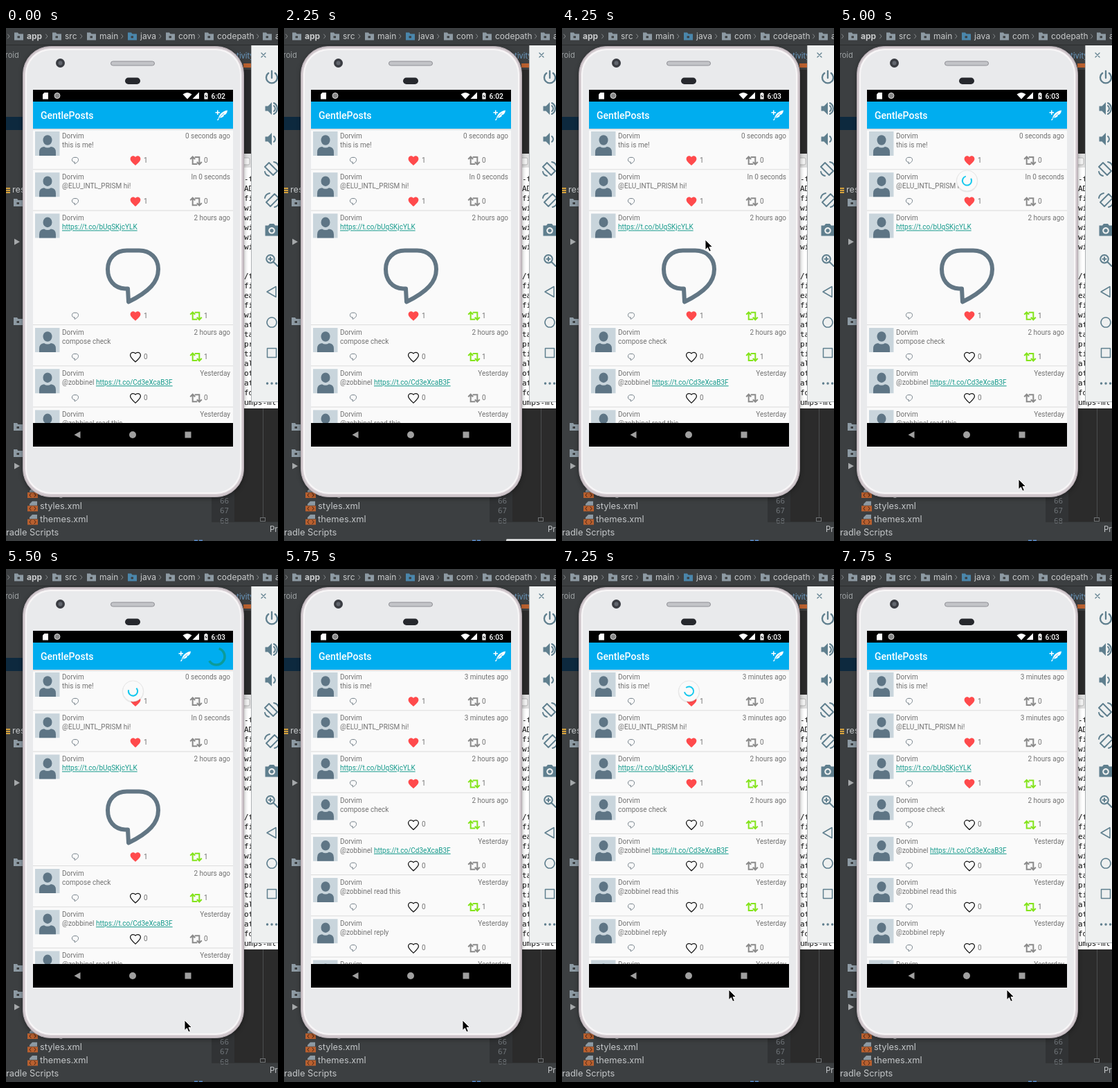
Animation, 393 px wide and 739 px high, one loop 8 s. Source, as an HTML page:

```html
<!DOCTYPE html>
<html lang="en">
<head>
<meta charset="utf-8">
<title>Timeline refresh</title>
<style>
  html, body { margin: 0; width: 100%; height: 100%; overflow: hidden; background: #3c3f41; }
  svg { display: block; width: 393px; height: 739px; }
  text { font-family: Roboto, sans-serif; font-size: 10px; white-space: pre; }
  .ide text { font-family: Inter, sans-serif; font-size: 12.8px; fill: #c3c6c8; }
  .ide .crumb { font-size: 12px; fill: #c9cbcc; }
  .ide .num { font: 11px "DejaVu Sans Mono", monospace; fill: #6d7276; }
  .term text { font: 11px "DejaVu Sans Mono", monospace; fill: #111; }
  .line { fill: none; stroke-linecap: round; stroke-linejoin: round; }
  .row text { fill: #727272; }
  .row .link { fill: #159a8c; text-decoration: underline; }
  .phone { filter: drop-shadow(0 2px 3px rgba(0, 0, 0, .35)); }
</style>
</head>
<body>
<svg viewBox="0 0 393 739" xmlns="http://www.w3.org/2000/svg">
  <defs>
    <path id="bubble" class="line" d="M-11.500 18C-28 17-36.500 5-36.500-10C-36.500-26-25-37-9-37H9C25-37 36.500-26 36.500-10C36.500 8 24 22-6.500 37L-7.500 18Z"/>
    <path id="heart" d="M0 9.350L-1.450 8.030C-6.600 3.360-10 .28-10-3.500C-10-6.580-7.580-9-4.500-9C-2.760-9-1.090-8.190 0-6.910C1.090-8.190 2.760-9 4.500-9C7.580-9 10-6.580 10-3.500C10 .28 6.600 3.360 1.450 8.040Z"/>
    <path id="retweet" class="line" style="stroke-linecap:butt;stroke-linejoin:miter" stroke-width="2" d="M-8.300-2L-4.800-5.500L-1.300-2M-4.800-5V5H1.800M8.300 2L4.800 5.500L1.300 2M4.800 5V-5H-1.800"/>
    <path id="folder" d="M0 0H5L6.500 2H13V11H0ZM4.500 5V8H8V5Z" fill-rule="evenodd"/>
    <clipPath id="view"><rect x="39" y="145" width="289" height="424"/></clipPath>
    <linearGradient id="shade" x2="0" y2="1">
      <stop stop-opacity=".16"/><stop offset="1" stop-opacity="0"/>
    </linearGradient>
  </defs>
  <g class="ide" id="ide"></g>
  <g class="term" id="term"></g>
  <rect id="tip" fill="#d5d6d7" rx="1.500" height="8"/>
  <g id="tools"></g>

  <g class="phone">
    <rect x="24.500" y="26.500" width="319" height="649" rx="40" fill="#cfc6cb" stroke="#b3aab0"/>
    <rect x="27.500" y="29.500" width="313" height="642" rx="37" fill="#f8f6f7" stroke="#dfd9dd"/>
    <rect x="30" y="32" width="308" height="637" rx="35" fill="#e9eaec"/>
  </g>
  <circle cx="78.500" cy="50.500" r="6.500" fill="#3a3c42"/>
  <circle cx="78.500" cy="50.500" r="3" fill="#62666e"/>
  <rect x="151.500" y="48" width="63" height="6" rx="3" fill="#c3c4c8" stroke="#8f9096"/>
  <rect x="172" y="71.500" width="22" height="9.500" rx="4.750" fill="#26282d"/>

  <rect x="39" y="89" width="289" height="514"/>
  <g fill="#fff">
    <path d="M55.500 93H61V102.500H53V95.500Z"/>
    <circle cx="74" cy="97.500" r="4" fill="#888" stroke="#ddd"/>
    <path d="M255.500 95.500Q262 90.500 268.500 95.500L262 102.500Z"/>
    <path d="M279 92.500V102H269.500Z"/>
    <path d="M286.500 94H288V93H290V94H291.500V102.500H286.500Z"/>
    <path d="M289.500 95L287.500 98.500H289L288.500 101.500L290.500 98H289Z" fill="#000"/>
    <text id="clock" x="296.500" y="101.500" style="font-size:10.400px;font-weight:500"></text>
  </g>
  <rect x="39" y="106" width="289" height="39" fill="#00adef"/>
  <text x="50" y="130.500" fill="#fff" style="font-size:14px;font-weight:500">GentlePosts</text>
  <g id="compose" fill="#fff">
    <path d="M302.500 121H305V118.500H306.500V121H309V122.500H306.500V125H305V122.500H302.500Z"/>
    <path d="M305 133L309 125Q313 119.500 320 118.500Q319.500 123 316.500 125L314 125.500L315 126.500Q312.500 129.500 308.500 129.500L306.500 133Z"/>
    <path d="M306.500 131L315 122.500" stroke="#00adef" stroke-width=".8"/>
  </g>
  <path id="loader" class="line" style="stroke-linecap:butt" stroke="#0c9b99" stroke-width="3.600"/>
  <g clip-path="url(#view)">
    <rect x="39" y="145" width="289" height="424" fill="#fafafa"/>
    <g id="before"></g>
    <g id="after"></g>
    <rect x="39" y="145" width="289" height="3" fill="url(#shade)"/>
  </g>
  <g fill="#a0a0a0">
    <path d="M98.500 586L107.500 581V591Z"/>
    <circle cx="183" cy="586" r="5"/>
    <rect x="258.500" y="581.500" width="9" height="9"/>
  </g>
  <g id="pull">
    <circle cy=".8" r="15.800" fill="#000" opacity=".07"/>
    <circle r="15" fill="#fafafa" stroke="#e3e3e3" stroke-width=".8"/>
    <path id="arc" class="line" style="stroke-linecap:butt" stroke="#14c8ee" stroke-width="2"/>
  </g>
  <path id="cursor" d="M0 0V14.500L3.400 11.400L5.800 17L8.300 16L5.900 10.500H10.500Z" fill="#000" stroke="#fff" stroke-width=".9"/>
</svg>

<script>
const $ = id => document.getElementById(id);
const LOOP = 8000;
const text = (x, y, s, attrs = '') => `<text x="${x}" y="${y}" ${attrs}>${s}</text>`;
const rect = (x, y, w, h, fill) => `<rect x="${x}" y="${y}" width="${w}" height="${h}" fill="${fill}"/>`;
const use = (id, x, y, scale, attrs) =>
  `<use href="#${id}" transform="translate(${x} ${y}) scale(${scale})" ${attrs}/>`;

// Code editor behind the phone
function drawIde() {
  const crumbs = [['app', 30], ['src', 85], ['main', 135], ['java', 194],
                  ['com', 249], ['codepath', 305], ['a', 389]];
  const ends = [59, 109, 168, 223, 279, 364];
  let s = rect(0, 0, 393, 739, '#3c3f41') + rect(0, 24, 393, 1, '#2b2d2e');
  crumbs.forEach(([name, x], i) => {
    s += use('folder', x - 18, 6.5, 1, `fill="${name === 'java' ? '#4a86ab' : '#8d9aa3'}"`);
    s += text(x, 16, name, `class="crumb"${i ? '' : ' style="font-weight:700"'}`);
  });
  for (const x of [4, ...ends])
    s += `<path class="line" d="M${x - 1.5} 9L${x + 1} 12L${x - 1.5} 15" stroke="#85898b"/>`;

  s += text(-8, 43, 'droid', 'style="font-size:11px;fill:#9fa3a5"');
  s += rect(0, 128, 26, 19, '#0d293e') + text(9, 237, 'res');
  for (const y of [230, 233, 236]) s += rect(0, y, 6, 2, '#d6a23c');
  for (const y of [246, 417, 569, 607]) s += use('folder', 11, y, 1, 'fill="#8d9aa3"');
  for (const y of [308, 631]) s += `<path d="M12 ${y - 4.5}V${y + 4.5}L20 ${y}Z" fill="#a5a8aa"/>`;

  ['strings', 'styles', 'themes'].forEach((name, i) => {
    const y = 673.5 + i * 19.3;
    s += text(49, y, name + '.xml');
    s += `<path d="M38 ${y - 11}H45V${y - 5}H34V${y - 7}Z" fill="#8d9aa3"/>` +
      rect(31, y - 4.5, 15, 8, '#b9602f') +
      `<path class="line" d="M36 ${y - 3}L34 ${y - .5}L36 ${y + 2}M41 ${y - 3}L43 ${y - .5}L41 ${y + 2}" stroke="#432315"/>`;
  });
  s += text(0, 731, 'radle Scripts');

  s += rect(297, 60, 33, 651, '#313335') + rect(330, 60, 63, 651, '#2b2b2b');
  [66, 67, 68].forEach((n, i) => s += text(309, 684.5 + i * 14.6, n, 'class="num"'));
  s += rect(371, 548, 1, 157, '#4b4e50') +
    '<rect x="367.500" y="705.500" width="7" height="5" fill="#2b2b2b" stroke="#707375"/>';
  s += rect(297, 711, 96, 1, '#323435') + text(381, 726, 'Pr', 'style="font-size:11.500px"');
  s += text(327, 44, 'ctivity', 'style="font-size:11px;fill:#6b9ac0"') + rect(343, 51, 11, 6, '#b9602f');
  s += rect(272, 737.5, 5, 2, '#5b8fd0') + rect(279, 737.5, 5, 2, '#5b8fd0');
  return s;
}

function drawTerminal() {
  const rows = ['-to', 'ADM', 'fil', 'win', 'win', 'win', 'win', 'win', '', '', '/to', 'fil', 'eat',
    'fil', 'win', 'ati', 'ta', 'pro', 'tin', 'al', 'ot', 'att', 'fd5', 'umps-ml'];
  return rect(335, 181, 58, 367, '#fff') + rect(335, 181, 58, 20, '#dedede') +
    '<rect x="341" y="187" width="11" height="10" rx="2" fill="#f4f4f4" stroke="#b5b5b5"/>' +
    rows.map((s, i) => text(344, 220.5 + i * 14, s)).join('');
}

// Emulator side bar; each icon is drawn around its own centre
function drawTools() {
  const speaker = 'M-9.500-3.500H-5.500L0-9V9L-5.500 3.500H-9.500Z';
  const solid = (y, d) => `<path transform="translate(384 ${y})" d="${d}" fill="#5f7f8e" fill-rule="evenodd"/>`;
  const line = (y, d, w = 2) =>
    `<path class="line" transform="translate(384 ${y})" d="${d}" stroke="#5f7f8e" stroke-width="${w}"/>`;
  return rect(354, 25, 39, 514, '#aeb2b4') + rect(355, 25, 38, 513, '#eef0f0') +
    line(39, 'M-15-3L-9 3M-9-3L-15 3', 1.3) +
    line(71, 'M0-9V1M-4.800-6A8 8 0 1 0 4.800-6', 2.3) +
    solid(116, speaker) + line(116, 'M3-4A5 5 0 0 1 3 4M3-8A9 9 0 0 1 3 8') +
    solid(160, speaker) + line(160, 'M3-4A5 5 0 0 1 3 4') +
    line(203, 'M-4-9L8 3L2 9L-10-3ZM3-10Q9-9 10-3M-10 4Q-9 9-4 10', 1.9) +
    line(248, 'M4-9L-8 3L-2 9L10-3ZM-3-10Q-9-9-10-3M10 4Q9 9 4 10', 1.9) +
    solid(291, 'M-9.500-6.500H-5L-3-9H3L5-6.500H9.500V8.500H-9.500ZM0-4A4.800 4.800 0 1 0 .01-4ZM0-1.800A2.700 2.700 0 1 1-.01-1.800Z') +
    line(335, 'M-2-8A5.700 5.700 0 1 0-1.990-8M2.500 2L8.500 8M-4.500-2.300H.5M-2-4.800V.2') +
    line(380, 'M-7 0L6-7.500V7.500Z', 1.5) +
    line(424, 'M0-7A7 7 0 1 0 .01-7', 1.5) +
    line(468, 'M-6.500-6.500H6.500V6.500H-6.500Z', 1.5) +
    line(512, 'M-6.500 0H-6.400M0 0H.1M6.500 0H6.600', 3.4);
}

const link = s => `<tspan class="link">https://t.co/${s}</tspan>`;
// text, age, liked, retweeted
const posts = [
  ['this is me!', '', 1, 0],
  ['@ELU_INTL_PRISM hi!', '', 1, 0],
  [link('bUqSKjcYLK'), '2 hours ago', 1, 1],
  ['compose check', '2 hours ago', 0, 1],
  ['@zobbinel ' + link('Cd3eXcaB3F'), 'Yesterday', 0, 0],
  ['@zobbinel read this', 'Yesterday', 0, 1],
  ['@zobbinel reply', 'Yesterday', 0, 0],
  ['', 'Yesterday', 0, 0],
];

function avatar(y) {
  return rect(42, y, 35.5, 35, '#c9d5dc') +
    `<g transform="translate(60 ${y})" fill="#5e7585"><ellipse cy="12.500" rx="6.500" ry="7.300"/>` +
    '<path d="M-12 35V30Q-12 22.500-5 22Q0 25 5 22Q12 22.500 12 30V35Z"/></g>';
}

function drawList(ages, picture) {
  let top = 145;
  return posts.map(([body, age, liked, shared], i) => {
    const tall = picture && i === 2 ? 105.4 : 0;
    const y = top, act = y + 46 + tall;
    top += 59.2 + tall;
    return '<g class="row">' + avatar(y + 4) +
      text(81, y + 14, 'Dorvim') + text(81, y + 27, body) +
      text(324, y + 14, ages[i] || age, 'text-anchor="end"') +
      (tall ? use('bubble', 183.5, y + 94.1, 1, 'stroke="#627684" stroke-width="6"') : '') +
      use('bubble', 100, act, .125, 'stroke="#75818a" stroke-width="8"') +
      use('heart', 187, act, .74, liked ? 'fill="#ff4a4c"' : 'fill="none" stroke="#111" stroke-width="1.700"') +
      text(199, act + 2.8, liked) +
      use('retweet', 274.5, act, 1, `stroke="${shared ? '#84e41c' : '#8b8b8b'}"`) +
      text(286, act + 2.8, shared) +
      rect(39, top - .9, 289, 1, '#dcdcdc') + '</g>';
  }).join('');
}

$('ide').innerHTML = drawIde();
$('term').innerHTML = drawTerminal();
$('tools').innerHTML = drawTools();
$('before').innerHTML = drawList(['0 seconds ago', 'In 0 seconds'], true);
$('after').innerHTML = drawList(['3 minutes ago', '3 minutes ago'], false);

// Steps: start time, then values; a bare time hides the part
const cursorSteps = [[0], [3250, 226, 323], [3500, 226, 389], [3750, 234, 573], [4250, 207, 305],
  [4500, 213, 226], [4750, 215, 363], [5000, 258, 650], [6000, 235, 403], [6250, 228, 221],
  [6500, 225, 221], [6750, 235, 458], [7000, 241, 606]];
// y, arc start, arc end
const pullSteps = [[0], [4750, 195, -90, 80], [5000, 220, -30, 255], [5250, 176, -80, 60],
  [5500, 176, -42, 195], [5750], [6750, 220, -60, 225], [7000, 220, -20, 268],
  [7250, 176, -130, 170], [7500, 176, 20, 250], [7750]];
const loaderSteps = [[0], [5250, -90, 20], [5500, -72, 148], [5750], [7500, -80, 60], [7750]];
// x, y, width
const tipSteps = [[0], [1250, 369, 736, 30], [1500, 289, 736, 110], [2250, 321, 736, 80],
  [2750, 289, 734, 73], [3000, 237, 736, 121], [3250]];

const at = (steps, t) => steps.findLast(s => s[0] <= t).slice(1);
const show = (id, on) => $(id).style.display = on ? '' : 'none';
const move = (id, x, y) => $(id).setAttribute('transform', `translate(${x} ${y})`);

function arc(r, from, to) {
  const p = deg => [Math.cos(deg * Math.PI / 180) * r, Math.sin(deg * Math.PI / 180) * r].map(v => v.toFixed(2));
  return `M${p(from)}A${r} ${r} 0 ${+(to - from > 180)} 1 ${p(to)}`;
}

function render(t) {
  const [cx, cy] = at(cursorSteps, t);
  show('cursor', cx);
  if (cx) move('cursor', cx, cy);

  const [py, from, to] = at(pullSteps, t);
  show('pull', py);
  if (py) {
    move('pull', 183.5, py);
    $('arc').setAttribute('d', arc(6.6, from, to));
  }

  const [start, end] = at(loaderSteps, t);
  const loading = end !== undefined;
  show('loader', loading);
  move('compose', loading ? -53 : 0, 0);
  if (loading) {
    $('loader').setAttribute('d', arc(12, start, end));
    move('loader', 304, 126);
  }

  const [x, y, w] = at(tipSteps, t);
  show('tip', w);
  if (w) Object.entries({ x, y, width: w }).forEach(([k, v]) => $('tip').setAttribute(k, v));

  $('clock').textContent = t < 3000 ? '6:02' : '6:03';
  show('before', t < 5750);
  show('after', t >= 5750);
}

const began = performance.now();
function tick() {
  render((performance.now() - began) % LOOP);
  requestAnimationFrame(tick);
}
tick();
</script>
</body>
</html>
```
